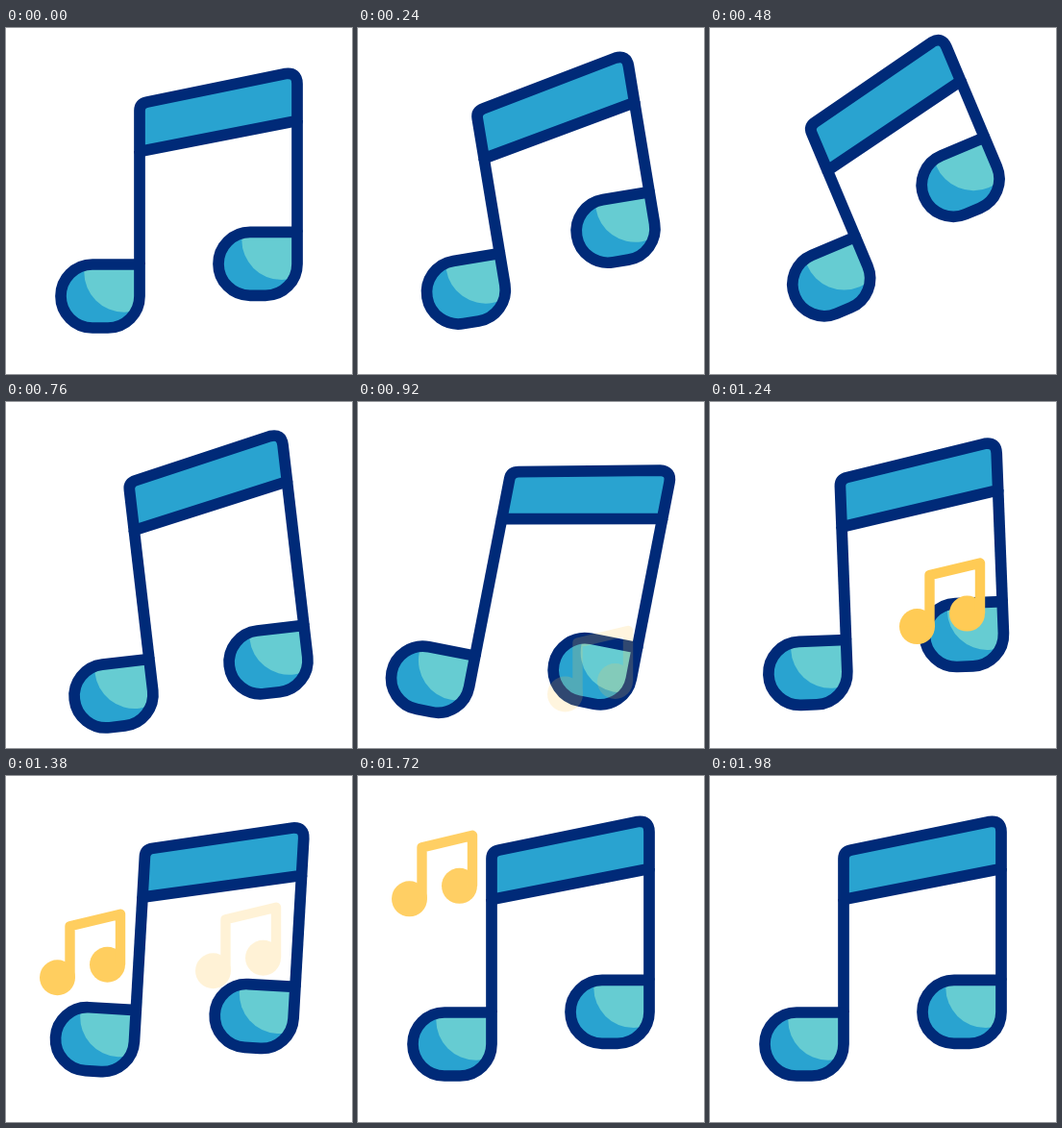
These frames come from a looping animation (360 by 360 pixels, 2 s). An HTML page:

```html
<!DOCTYPE html>
<html lang="en">
<head>
<meta charset="utf-8">
<title>Music note</title>
<style>
  html, body { margin: 0; width: 100%; height: 100%; overflow: hidden; background: #fff; }
  svg { display: block; width: 100%; height: 100%; }
  .line { fill: none; stroke: #002a78; stroke-width: 11.7; stroke-linejoin: round; }
  .blue { fill: #29a3d0; }
  .teal { fill: #66ccd2; }
  .small { fill: #ffcb55; }
  .small path { fill: none; stroke: #ffcb55; stroke-width: 10.4; stroke-linejoin: round; }
</style>
</head>
<body>
<svg viewBox="0 0 360 360">
  <defs>
    <path id="bowl" d="M139 246H90a33 33 0 0 0 0 66H106a33 33 0 0 0 33-33Z"/>
    <path id="beam" d="M139 128.400V86Q139 78.500 147 77L291 47.500Q303 46 303 58V96.400Z"/>
    <clipPath id="inside"><use href="#bowl"/></clipPath>
    <g id="head">
      <use href="#bowl" class="blue"/>
      <circle class="teal" cx="123" cy="254" r="41.700" clip-path="url(#inside)"/>
      <use href="#bowl" class="line"/>
    </g>
    <g id="smallNote" class="small">
      <circle cx="18.500" cy="71" r="18.500"/>
      <circle cx="70.500" cy="57.500" r="18.500"/>
      <path d="M31.500 71V17.500L84 5V57.500"/>
    </g>
  </defs>
  <g id="note">
    <path id="leftStem" class="line"/>
    <path id="rightStem" class="line"/>
    <use id="leftHead" href="#head"/>
    <use id="rightHead" href="#head"/>
    <use href="#beam" class="blue"/>
    <use href="#beam" class="line"/>
  </g>
  <use id="rightSmall" href="#smallNote"/>
  <use id="leftSmall" href="#smallNote"/>
</svg>
<script>
const LOOP = 2000;
const el = id => document.getElementById(id);

// Keys are [time, value]; each span eases in and out.
const tilt = [[0, 0], [560, -24], [975, 12.5], [1147, -6], [1360, 3.3], [1660, 0]];
const leftStretch = [[0, 0], [560, -45], [852, 35], [1080, 0]];
const rightStretch = [[0, 0], [560, -55], [789, 38], [1070, 0]];

function sample(keys, t) {
  const next = keys.findIndex(key => key[0] > t);
  if (next < 0) return keys[keys.length - 1][1];
  const [t0, v0] = keys[next - 1], [t1, v1] = keys[next];
  const p = (1 - Math.cos(Math.PI * (t - t0) / (t1 - t0))) / 2;
  return v0 + (v1 - v0) * p;
}

const clamp = v => Math.max(0, Math.min(1, v));

function placeHead(side, x, top, joint, stretch) {
  el(side + 'Stem').setAttribute('d', `M${x} ${top}V${joint + stretch}`);
  el(side + 'Head').setAttribute('transform', `translate(${x - 139} ${joint - 246 + stretch})`);
}

function placeSmall(side, x, y, start, end, t) {
  const use = el(side + 'Small');
  use.setAttribute('transform', `translate(${x} ${y})`);
  use.setAttribute('opacity', Math.min(clamp((t - start) / 80), clamp((end - t) / 85)));
}

function draw(t) {
  el('note').setAttribute('transform', `rotate(${sample(tilt, t)} 180 180)`);
  placeHead('left', 139, 128, 246, sample(leftStretch, t));
  placeHead('right', 303, 96, 212.4, sample(rightStretch, t));
  placeSmall('right', 197, 198 - 0.22 * (t - 1080), 906, 1401, t);
  placeSmall('left', 35, 139 - 0.241 * (t - 1380), 1306, 1798, t);
}

const begin = performance.now();
function tick() {
  draw((performance.now() - begin) % LOOP);
  requestAnimationFrame(tick);
}
tick();
</script>
</body>
</html>
```
